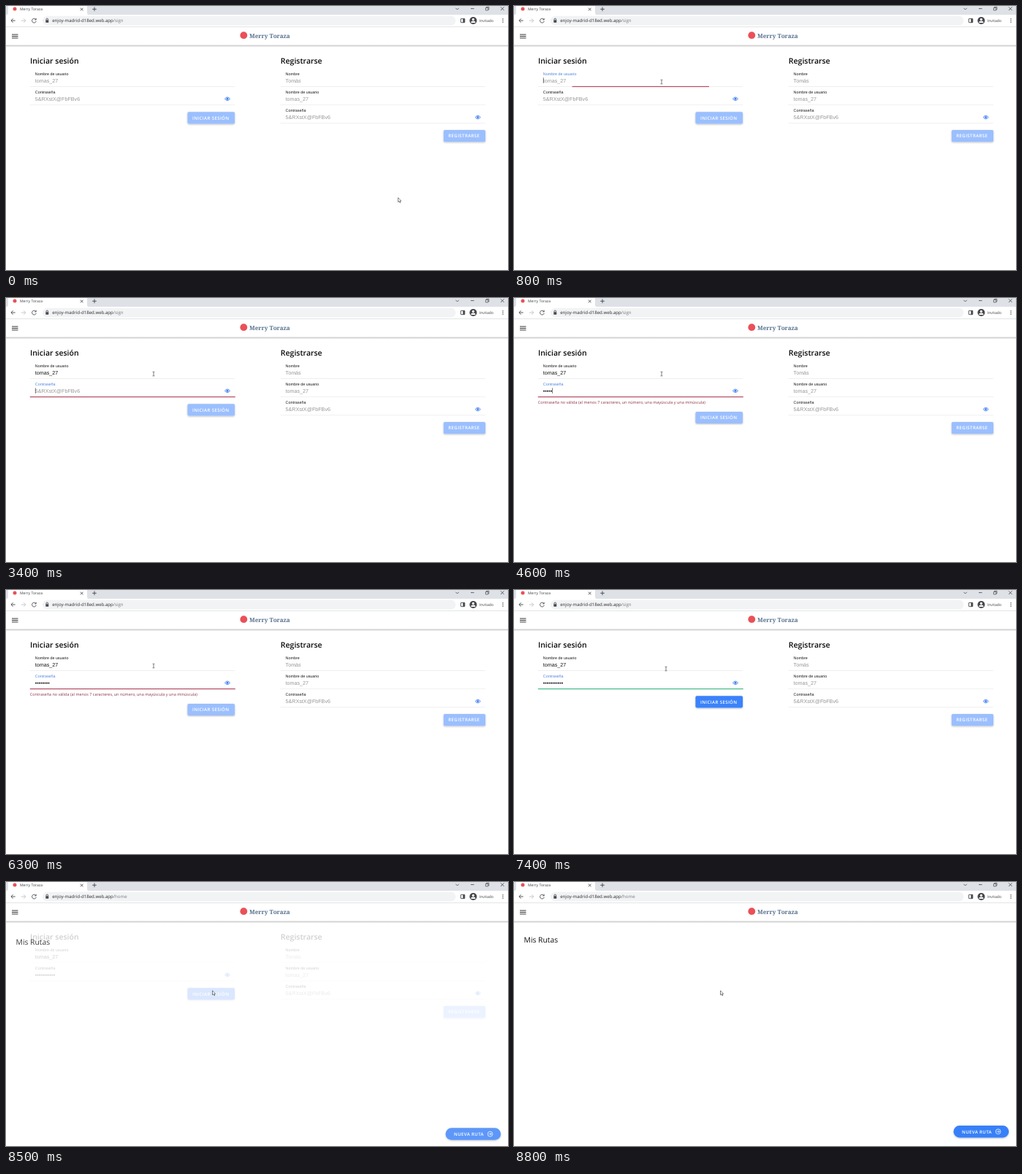
These frames come from a looping animation (687 by 362 pixels, 9000 ms). An HTML page:

```html
<!DOCTYPE html>
<html lang="es">
<head>
<meta charset="utf-8">
<title>Merry Toraza</title>
<style>
  html, body { margin: 0; width: 100%; height: 100%; overflow: hidden; background: #fff; }
  svg { display: block; width: 687px; height: 362px; }
  text { font-family: "Open Sans", "Noto Sans", sans-serif; text-rendering: geometricPrecision; white-space: pre; }
  .brand { font: 700 8.1px "Noto Serif", serif; fill: #58718e; }
  .chrome { font-size: 5.1px; fill: #3c4043; }
  .url { font-size: 6.1px; fill: #27292c; }
  .h { font-size: 10.5px; font-weight: 600; fill: #0b0b0b; }
  .label { font: 5.38px "Liberation Sans", Arial, sans-serif; fill: #151515; }
  .input { font: 7.17px "Liberation Sans", Arial, sans-serif; fill: #969696; }
  .btn { font-size: 6.1px; font-weight: 600; letter-spacing: .37px; fill: #fff; }
  .error { font-size: 5.48px; fill: #8c3546; }
  .line { stroke: #e4e4e6; stroke-width: .6; }
  .icon { fill: none; stroke: #45484c; stroke-width: .9; }
</style>
</head>
<body>
<svg viewBox="0 0 687 362">
  <defs>
    <filter id="shadow" x="-10%" y="-20%" width="120%" height="160%">
      <feDropShadow dx="0" dy=".9" stdDeviation=".8" flood-opacity=".28"/>
    </filter>
    <linearGradient id="fade" x2="0" y2="1">
      <stop stop-color="#bdbdbd"/><stop offset="1" stop-color="#fff"/>
    </linearGradient>
    <g id="eye">
      <path d="M-3.6 0Q0 -4.6 3.6 0Q0 4.6 -3.6 0Z" fill="#dfeaff" stroke="#4a88f5" stroke-width=".9"/>
      <circle r="1.4" fill="#3b7bee"/>
    </g>
  </defs>
  <rect width="687" height="362" fill="#fff"/>

  <g id="sign">
    <text class="h" x="33" y="79.3">Iniciar sesión</text>
    <text class="h" x="375.8" y="79.3">Registrarse</text>
    <g id="fields"></g>
    <use href="#eye" x="303" y="127.3"/>
    <use href="#eye" x="645.7" y="152.6"/>
    <rect id="userBar" y="109.9" height="1.2"/>
    <rect id="passBar" y="135" height="1.2"/>
    <rect id="caret" width=".6" height="7.6" fill="#222"/>
    <text id="error" class="error" x="32.8" y="145.4">Contraseña no válida (al menos 7 caracteres, un número, una mayúscula y una minúscula)</text>
    <g id="login">
      <rect id="loginBox" x="248.4" y="145.2" width="64.7" height="16.2" rx="1.8" filter="url(#shadow)"/>
      <text class="btn" x="255" y="155.6">INICIAR SESIÓN</text>
    </g>
    <rect x="598.8" y="170" width="57.3" height="16.2" rx="1.8" fill="#9bbffe" filter="url(#shadow)"/>
    <text class="btn" x="605.3" y="180.4">REGISTRARSE</text>
  </g>

  <g id="home">
    <rect y="54" width="687" height="340" fill="#fff"/>
    <text x="13.6" y="82.6" font-size="10.3" fill="#111">Mis Rutas</text>
    <rect x="601.5" y="334" width="75.7" height="16.4" rx="8.2" fill="#3880f8" filter="url(#shadow)"/>
    <text class="btn" x="613" y="344.5">NUEVA RUTA</text>
    <g fill="none" stroke="#fff" stroke-width=".75">
      <circle cx="662.6" cy="342.2" r="3.4"/>
      <path d="M660.8 342.2h3.5m-1.5-1.6l1.6 1.6l-1.6 1.6"/>
    </g>
  </g>

  <g id="appBar">
    <rect y="29" width="687" height="25" fill="#fff"/>
    <rect y="53.7" width="687" height="2.6" fill="url(#fade)"/>
    <path d="M8 39.1h8.5M8 41.5h8.5M8 43.9h8.5" stroke="#333" stroke-width="1"/>
    <circle cx="325.3" cy="40.2" r="4.9" fill="#ea5057"/>
    <text class="brand" x="333" y="43.6">Merry Toraza</text>
  </g>

  <g id="browser">
    <rect width="687" height="12.5" fill="#dee1e6"/>
    <path d="M0 12.5Q3 12 3 9V0H111V9Q111 12 114 12.5Z" fill="#fff"/>
    <rect y="12" width="687" height="17" fill="#fff"/>
    <path d="M0 28.6H687" stroke="#dadce0" stroke-width=".8"/>
    <circle cx="12" cy="4" r="2.5" fill="#ea5057"/>
    <text class="chrome" x="19" y="6.3">Merry Toraza</text>
    <g class="icon">
      <path d="M101.9 2.7l3.6 3.6m0-3.6l-3.6 3.6M118.2 4.3h5.6M121 1.5v5.6"/>
      <path d="M615.4 2.8l2.2 2.2l2.2-2.2M636 3.6h4.6M677 1.4l4.6 4.6m0-4.6l-4.6 4.6" stroke-width=".8"/>
      <path d="M656.4 2.5h3.4v3.4h-3.4zM657.5 2.5v-1.1h3.4v3.4h-1.1" stroke-width=".7"/>
      <path d="M12.7 20H7m2.6-2.7L6.9 20l2.7 2.7"/>
      <path d="M21 20h5.7m-2.6-2.7l2.7 2.7l-2.7 2.7" stroke="#bfc2c6"/>
      <path d="M40.7 18.2A2.9 2.9 0 1 0 41.3 20.8M41.2 16.9v2h-2"/>
    </g>
    <rect x="50" y="13.8" width="565.5" height="12.6" rx="6.3" fill="#f1f3f4"/>
    <rect x="54.3" y="19.3" width="4" height="3.4" rx=".4" fill="#45484c"/>
    <path class="icon" d="M55 19.4v-1a1.3 1.3 0 0 1 2.6 0v1" stroke-width=".6"/>
    <text class="url" x="63.2" y="22.4">enjoy-madrid-d18ed.web.app<tspan id="path" fill="#777b80"></tspan></text>
    <rect class="icon" x="622.4" y="17.3" width="5.4" height="5.4" rx=".6"/>
    <rect x="625.3" y="17.3" width="2.5" height="5.4" fill="#45484c"/>
    <circle cx="639.4" cy="20" r="5" fill="#44474b"/>
    <circle cx="639.4" cy="18.4" r="1.6" fill="#fff"/>
    <path d="M636.3 23a3.1 2.4 0 0 1 6.2 0Z" fill="#fff"/>
    <text class="chrome" x="647.8" y="22">Invitado</text>
    <g fill="#45484c"><circle cx="680" cy="17.7" r=".7"/><circle cx="680" cy="20" r=".7"/><circle cx="680" cy="22.3" r=".7"/></g>
  </g>

  <g id="cursor">
    <path id="arrow" d="M0 0V6L1.4 4.8L2.4 7L3.4 6.5L2.4 4.5H4.2Z" fill="#fff" stroke="#222" stroke-width=".55"/>
    <path id="beam" d="M-1.4 -2.8H-.3L0 -2.5L.3 -2.8H1.4M0 -2.5V2.5M-1.4 2.8H-.3L0 2.5L.3 2.8H1.4" fill="none" stroke="#333" stroke-width=".65"/>
    <path id="hand" d="M-.6 .4Q0 -.4 .6 .4V2.6L3.2 3.2Q3.8 3.5 3.6 4.4L3 7H-.4L-2.3 4.4Q-2 3.5 -.6 4.3Z" fill="#fff" stroke="#222" stroke-width=".55"/>
  </g>
</svg>

<script>
const LOOP = 9000, STEP = 100;
const USER = "tomas_27", SAMPLE = "5&RXstX@FbFBv6";
const FOCUS_USER = 700, FOCUS_PASS = 3200, VALID = 6700, BLUR = 7800, LEAVE = 8400;
const userKeys = [1200, 1400, 1600, 1700, 1800, 2300, 2600, 2900];
const passKeys = [3800, 4000, 4300, 4500, 4600, 5100, 5800, 5800, 6500, 6700, 6900];
const caretResets = [FOCUS_USER, 3300, ...userKeys, ...passKeys];
// time, x, y, shape
const moves = [
  [0, 536.6, 262.8, "arrow"], [100, 500, 244, "arrow"], [200, 384, 190, "arrow"],
  [300, 268, 132, "arrow"], [400, 216, 108, "beam"], [500, 202, 104, "beam"],
  [7400, 208, 108, "beam"], [7500, 232, 124, "beam"], [7600, 262, 141, "arrow"],
  [7700, 279, 148, "hand"], [7800, 282.6, 149.8, "hand"], [8500, 282.5, 148.9, "arrow"]
];

const $ = id => document.getElementById(id);
const set = (el, attrs) => { for (const k in attrs) el.setAttribute(k, attrs[k]); };
const show = (el, on) => set(el, { visibility: on ? "visible" : "hidden" });
const clamp = v => Math.max(0, Math.min(1, v));
const within = (t, a, b) => t >= a && t < b;
const count = (keys, t) => keys.filter(k => k <= t).length;
const ramp = (t, start) => clamp((t - start + STEP) / 300);

function add(tag, attrs, text = "") {
  const el = document.createElementNS("http://www.w3.org/2000/svg", tag);
  set(el, attrs);
  el.textContent = text;
  return $("fields").appendChild(el);
}

function field(x, y, name, hint) {
  add("path", { class: "line", d: `M${x - 7} ${y + 15.6}h280.3` });
  return {
    hint,
    label: add("text", { class: "label", x, y }, name),
    input: add("text", { class: "input", x, y: y + 9.6 }, hint)
  };
}

const user = field(39.8, 94.9, "Nombre de usuario", USER);
const pass = field(39.8, 120, "Contraseña", SAMPLE);
field(382.6, 94.9, "Nombre", "Tomás");
field(382.6, 120, "Nombre de usuario", USER);
field(382.6, 145.1, "Contraseña", SAMPLE);

function fill(f, value, focused) {
  f.input.textContent = value || f.hint;
  f.input.style.fill = value ? "#111" : "";
  f.label.style.fill = focused ? "#4f83e0" : "";
}

function bar(el, scale, valid) {
  set(el, { x: 173.3 - 140.5 * scale, width: 281 * scale, fill: valid ? "#43bb86" : "#b44c60" });
}

function draw(t) {
  const typed = USER.slice(0, count(userKeys, t));
  const dots = "•".repeat(count(passKeys, t));
  const onUser = within(t, FOCUS_USER, FOCUS_PASS);
  const onPass = within(t, FOCUS_PASS, BLUR);
  fill(user, typed, onUser);
  fill(pass, dots, onPass);
  bar($("userBar"), ramp(t, FOCUS_USER) - ramp(t, FOCUS_PASS), typed);
  bar($("passBar"), ramp(t, FOCUS_PASS) - ramp(t, BLUR), t >= VALID);

  const value = onUser ? typed : dots;
  const active = onUser ? user : pass;
  const since = t - Math.max(0, ...caretResets.filter(k => k <= t));
  show($("caret"), (onUser || onPass) && Math.floor(since / 500) % 2 === 0);
  set($("caret"), {
    x: 39.9 + (value ? active.input.getComputedTextLength() : 0),
    y: onUser ? 98.2 : 123.3
  });

  const bad = dots && t < VALID;
  show($("error"), bad);
  set($("login"), { transform: `translate(0 ${bad ? 10.7 : 0})` });
  set($("loginBox"), { fill: t >= VALID ? "#3a82fb" : "#9bbffe" });

  // the new page rises and fades in
  const p = 1 - (1 - clamp((t - LEAVE + 50) / 350)) ** 3;
  show($("home"), t >= LEAVE);
  set($("home"), { opacity: p, transform: `translate(0 ${18 * (1 - p)})` });
  $("path").textContent = t < LEAVE ? "/sign" : "/home";

  const [, x, y, shape] = moves.filter(m => m[0] <= t).pop();
  set($("cursor"), { transform: `translate(${x} ${y})` });
  for (const id of ["arrow", "beam", "hand"]) show($(id), id === shape);
}

function tick() {
  const t = performance.now() % LOOP;
  draw(Math.floor(t / STEP) * STEP);
  requestAnimationFrame(tick);
}
tick();
</script>
</body>
</html>
```
